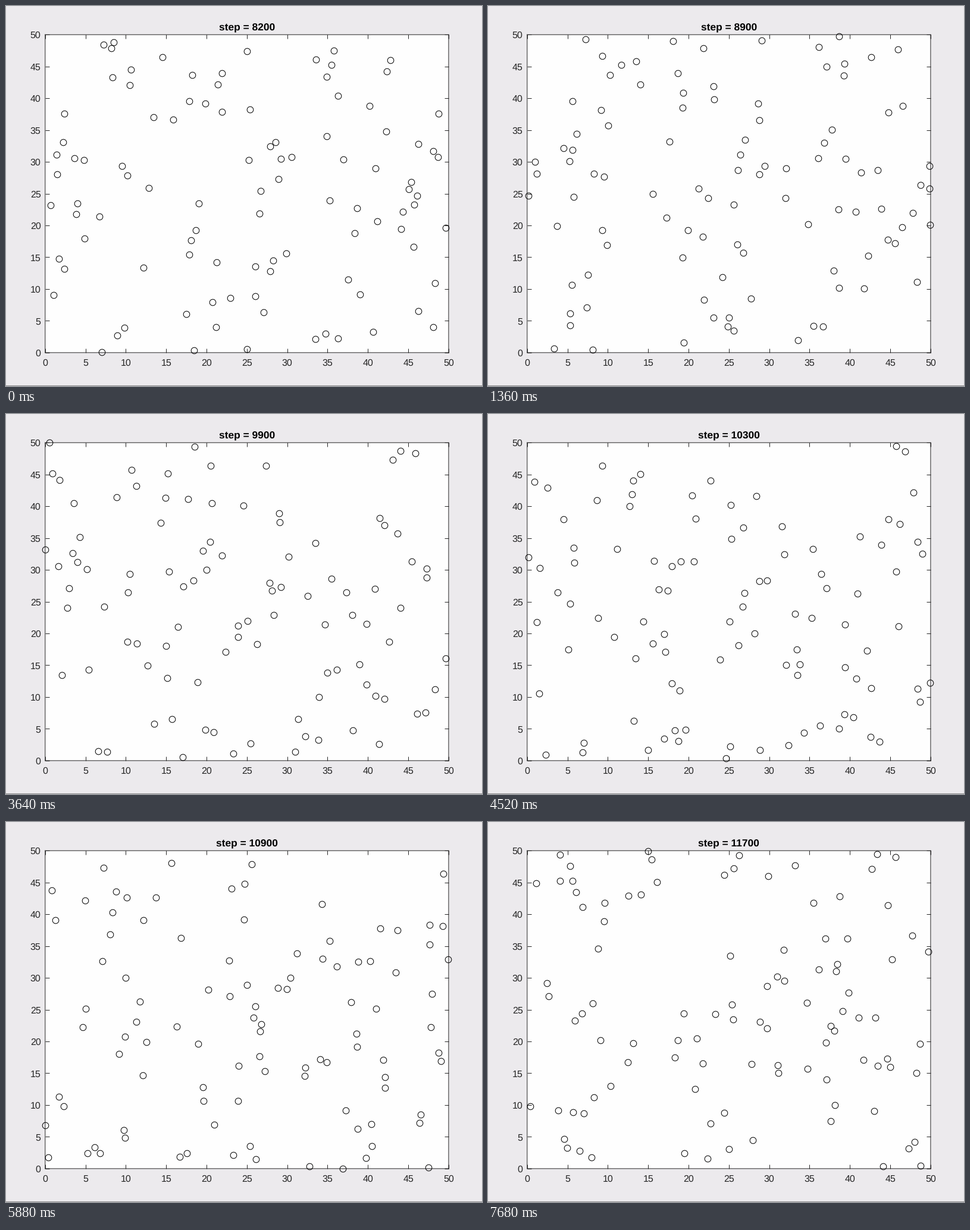
Write a matplotlib script that moves like this. It is 800x639 px and loops after 7.76 s.

```python
import numpy as np
import matplotlib.pyplot as plt
from matplotlib.animation import FuncAnimation

# Soft edges and unhinted text, as in a scaled screen recording
plt.rcParams.update({"path.snap": False, "text.hinting": "none"})

WIDTH, HEIGHT, DPI = 800, 639, 64
PX = 72 / DPI                      # one pixel in points
LEFT, RIGHT, TOP, BOTTOM = 65.8, 743.9, 48.2, 582.9
INK = "#262626"

BOX, COUNT = 50, 100
FRAMES, INTERVAL = 194, 40
FIRST_STEP, STEP_SIZE, STATES = 8200, 100, 36

CHANGES = np.interp(range(STATES - 1), [0, 11, 16, 34], [2, 61, 91, 192]).astype(int)


def wrap(delta):
    """Shortest separation in the periodic box."""
    return delta - BOX * np.round(delta / BOX)


def scatter(rng, spacing=1.1):
    """Random places that keep a minimum distance from each other."""
    points = np.empty((0, 2))
    while len(points) < COUNT:
        point = rng.uniform(0, BOX, 2)
        if np.all(np.hypot(*wrap(points - point).T) > spacing):
            points = np.vstack([points, point])
    return points


def forces(pos):
    """Lennard-Jones forces, softened at close range."""
    delta = wrap(pos[:, None] - pos[None])
    inv2 = 1 / np.maximum((delta ** 2).sum(axis=2), 0.9)
    inv6 = inv2 ** 3
    strength = 24 * inv2 * inv6 * (2 * inv6 - 1)
    return (strength[..., None] * delta).sum(axis=1)


def simulate(warmup=8, substeps=50, dt=0.01, temperature=1.1):
    """States of a thermostatted gas, after it has settled."""
    rng = np.random.default_rng(7)
    pos = scatter(rng)
    vel = rng.normal(size=pos.shape)
    vel -= vel.mean(axis=0)
    force = forces(pos)
    history = []
    for _ in range(warmup + STATES):
        for _ in range(substeps):
            vel += force * dt / 2
            pos = (pos + vel * dt) % BOX
            force = forces(pos)
            vel += force * dt / 2
        vel *= np.sqrt(temperature / np.mean(vel ** 2))
        history.append(pos)
    return history[warmup:]


fig = plt.figure(figsize=(WIDTH / DPI, HEIGHT / DPI), dpi=DPI, facecolor="#eceaed")


def label(x, y, text, size=16, **style):
    """Text with its baseline at pixel (x, y), measured from the top left."""
    return fig.text(x / WIDTH, 1 - y / HEIGHT, text, fontsize=size * PX,
                    family="Liberation Sans", va="baseline", **style)


ax = fig.add_axes([LEFT / WIDTH, 1 - BOTTOM / HEIGHT,
                   (RIGHT - LEFT) / WIDTH, (BOTTOM - TOP) / HEIGHT],
                  facecolor="#fefefe")
ticks = range(0, BOX + 1, 5)
ax.set(xlim=(0, BOX), ylim=(0, BOX), xticks=ticks, yticks=ticks)
ax.tick_params(direction="in", top=True, right=True, length=7 * PX, width=PX,
               color=INK, labelbottom=False, labelleft=False)
for spine in ax.spines.values():
    spine.set(linewidth=PX, color=INK)
for tick in ticks:
    share = tick / BOX
    label(LEFT + share * (RIGHT - LEFT), 605, tick, ha="center", color=INK)
    label(58.5, BOTTOM - share * (BOTTOM - TOP) + 6, tick, ha="right", color=INK)

fig.add_artist(plt.Rectangle((0, 0), 1, 1 / HEIGHT, transform=fig.transFigure,
                             color="#8c8b8d", linewidth=0))
title = label(404.8, 41, "", size=17.4, ha="center", weight="bold", color="black")
particles, = ax.plot([], [], "o", markersize=10.6 * PX, markerfacecolor="none",
                     markeredgecolor="black", markeredgewidth=PX,
                     clip_on=False, zorder=5)

history = simulate()


def update(frame):
    state = np.searchsorted(CHANGES, frame, side="right")
    particles.set_data(*history[state].T)
    title.set_text(f"step = {FIRST_STEP + STEP_SIZE * state}")
    return particles, title


animation = FuncAnimation(fig, update, frames=FRAMES, interval=INTERVAL,
                          repeat=True, repeat_delay=0, blit=False)
plt.show()
```
